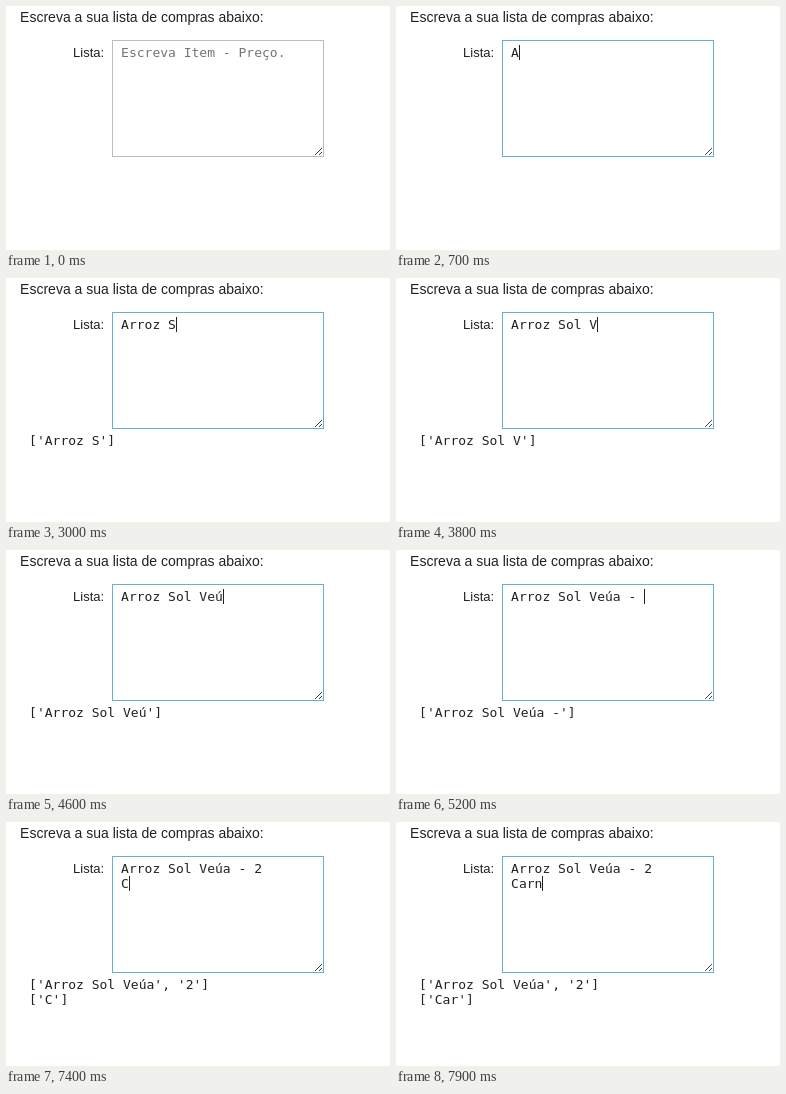
Write an HTML page that moves like this. It is 384 px wide and 244 px high and loops after 8 s.

```html
<!DOCTYPE html>
<html lang="pt">
<head>
<meta charset="utf-8">
<style>
  html, body { margin: 0; width: 100%; height: 100%; overflow: hidden; background: #fff; }
  div { position: absolute; white-space: pre; color: #212121; }
  .sans { font-family: "Liberation Sans", Arial, sans-serif; }
  .mono { font: 13px/15px "DejaVu Sans Mono", monospace; }
  #title { left: 14.1px; top: 3px; font-size: 14px; line-height: 16px; }
  #label { left: 67.1px; top: 39px; font-size: 13px; line-height: 15px; }
  #box { left: 106px; top: 34px; width: 210px; height: 115px; border: 1px solid #bdbdbd; }
  #box.focus { border-color: #6aaed8; }
  #entry { left: 115.1px; top: 39px; }
  #entry.hint { color: #757575; }
  #caret { width: 1px; height: 15px; background: #212121; }
  #output { left: 23.1px; top: 155px; }
  svg { position: absolute; left: 308px; top: 140px; }
</style>
</head>
<body>
<div id="title" class="sans">Escreva a sua lista de compras abaixo:</div>
<div id="label" class="sans">Lista:</div>
<div id="box"></div>
<svg width="9" height="9" stroke="#444"><path d="M1 9L8 2M5 9L8 6"/></svg>
<div id="entry" class="mono"></div>
<div id="caret"></div>
<div id="output" class="mono"></div>
<script>
const LOOP = 8000, SAMPLE = 100, FOCUS = 300;
const PRINT_LAG = 50, BLINK = 530;
const CHAR_WIDTH = 7.826, LINE_HEIGHT = 15;
const HINT = "Escreva Item - Preço.";

// Typing bursts: text, start time, gap between its keys
const BURSTS = [
  ["A", 680], ["rr", 980], ["o", 1520], ["z", 2120], [" ", 2380],
  ["S", 2920], ["ol ", 3180, 180], ["V", 3720], ["e", 3980], ["úa ", 4480, 180],
  ["- ", 5080], ["2", 5380], ["\n", 6580], ["C", 7280], ["a", 7520], ["rn", 7780],
];
const KEYS = BURSTS.flatMap(([text, start, gap = 100]) =>
  [...text].map((char, i) => ({ char, time: start + i * gap })));

const el = id => document.getElementById(id);
const [box, entry, caret, output] = ["box", "entry", "caret", "output"].map(el);

const keysUntil = t => KEYS.filter(key => key.time <= t);
const textAt = t => keysUntil(t).map(key => key.char).join("");

function setText(node, text) {
  if (node.textContent !== text) node.textContent = text;
}

function listLines(text) {
  return text.split("\n").filter(Boolean)
    .map(line => "[" + line.split(" - ").map(part => `'${part}'`).join(", ") + "]")
    .join("\n");
}

function caretVisible(t) {
  const lastKey = keysUntil(t).pop();
  const idle = t - (lastKey ? lastKey.time : FOCUS);
  return idle >= 0 && Math.floor(idle / BLINK) % 2 === 0;
}

function placeCaret(typed, visible) {
  const lines = typed.split("\n");
  const column = lines[lines.length - 1].length;
  caret.style.left = Math.round(115 + column * CHAR_WIDTH) + "px";
  caret.style.top = 39 + (lines.length - 1) * LINE_HEIGHT + "px";
  caret.style.visibility = visible ? "visible" : "hidden";
}

function draw(time) {
  const t = Math.floor(time / SAMPLE) * SAMPLE;
  const typed = textAt(t);
  box.classList.toggle("focus", t >= FOCUS);
  entry.classList.toggle("hint", !typed);
  setText(entry, typed || HINT);
  setText(output, listLines(textAt(t - PRINT_LAG)));
  placeCaret(typed, caretVisible(t));
}

const start = performance.now();
function tick() {
  draw((performance.now() - start) % LOOP);
  requestAnimationFrame(tick);
}
tick();
</script>
</body>
</html>
```
